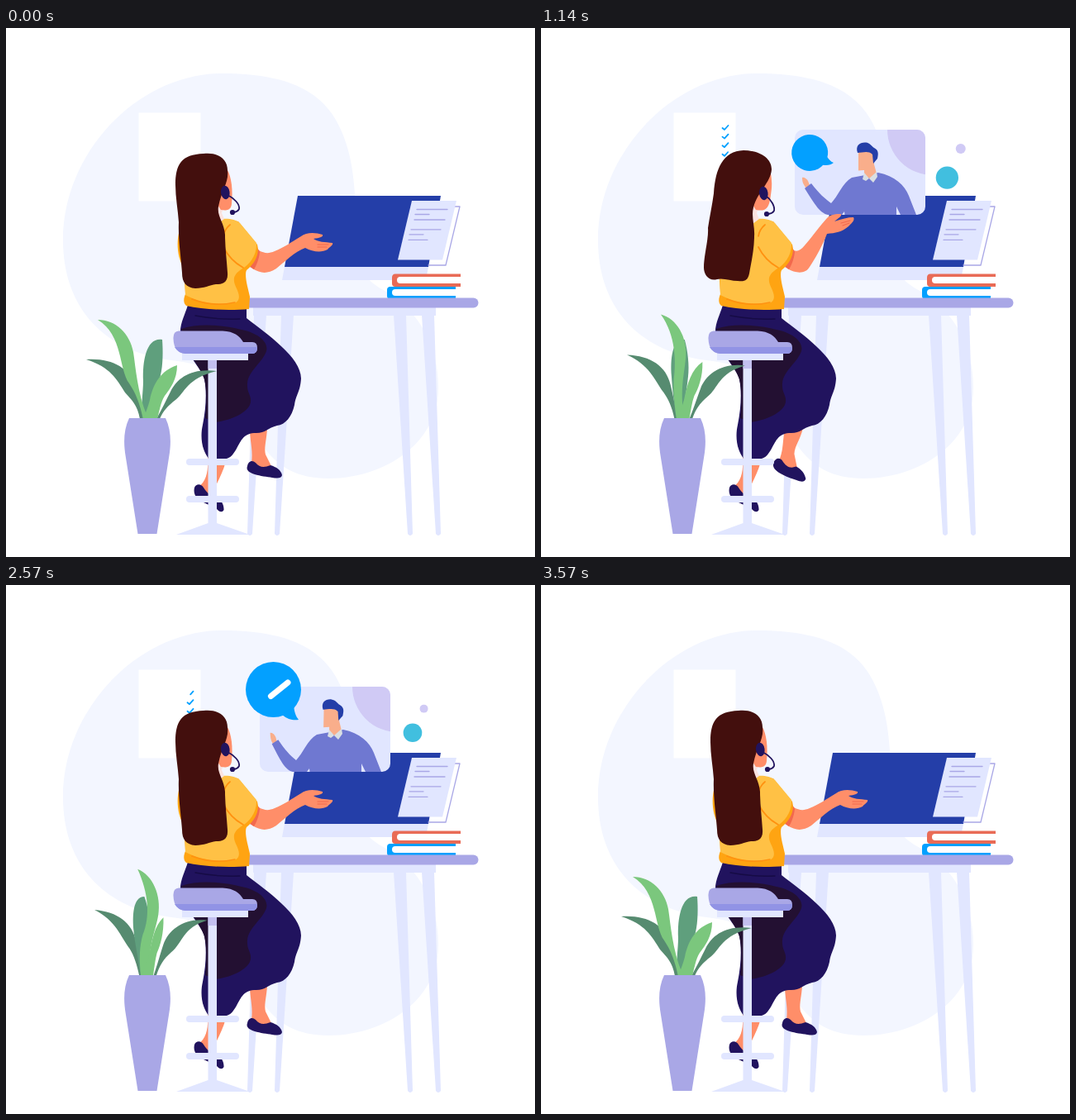
Animation of 640x640 px, one loop 3640 ms. Source, as an HTML page:

```html
<!DOCTYPE html>
<html lang="en">
<head>
<meta charset="utf-8">
<title>Online consultation</title>
<style>
  html, body { margin: 0; width: 100%; height: 100%; overflow: hidden; background: #fff; }
  svg { display: block; width: 100vw; height: 100vh; }
  .lilac { fill: #a9a7e6; }
  .pale { fill: #e1e6ff; }
  .navy { fill: #21135e; }
  .skin { fill: #ff8e69; }
  .blue { fill: #243ea8; }
  .sky { fill: #03a0ff; }
  .knit { fill: #6f78d1; }
  .tan { fill: #f9ae8b; }
  .dark { fill: #568b70; }
  .mid { fill: #5f9f7d; }
  .leaf { fill: #7bc77d; }
  .line { fill: none; stroke-linecap: round; stroke-linejoin: round; }
  .seam { stroke: #ff9110; stroke-width: 1.7; }
  .print { stroke: #a9a7e6; stroke-width: 1.3; }
</style>
</head>
<body>
<svg viewBox="0 0 640 640">
  <defs>
    <clipPath id="cardClip"><rect x="307" y="123" width="158" height="103" rx="10"/></clipPath>
  </defs>

  <!-- backdrop -->
  <path fill="#f3f6ff" d="M69,257C69,150 160,55 262,55C350,55 388,82 406,125C422,162 422,200 424,240C427,298 436,304 453,315C500,340 523,385 523,435C523,505 455,545 390,545C335,545 312,515 290,470C270,415 240,407 200,402C110,390 69,330 69,257Z"/>
  <rect x="160.500" y="102.500" width="75" height="107" fill="#fff"/>
  <g id="ticks" class="line" stroke="#03a0ff" stroke-width="1.800"></g>

  <!-- desk -->
  <g class="pale">
    <path d="M299,338H520V348H299Z"/>
    <path d="M300,347H315L298,612Q295,616 292,612Z"/>
    <path d="M333,347H348L331,612Q328,616 325,612Z"/>
    <path d="M469,347H484L492,612Q489,616 486,612Z"/>
    <path d="M503,347H518L526,612Q523,616 520,612Z"/>
  </g>

  <!-- monitor -->
  <path class="blue" d="M353,203H526L511,289H337Z"/>
  <path class="pale" d="M337,289H511L508,305H334Z"/>
  <path class="line print" d="M543,216H549L532,287H511"/>
  <path class="pale" d="M491,209H545L528,280.500H474Z"/>
  <path class="line print" d="M497,219.500H534M495,225.500H512M494,232H531M490,243.800H526M488,249.800H505M487,256.300H510"/>

  <!-- books -->
  <path fill="#e96b56" d="M550,297.500H471Q467,297.500 467,302V309Q467,313 471,313H550Z"/>
  <path fill="#fff" d="M550,301H477Q473,301 473,305T477,309H550Z"/>
  <path class="sky" d="M544,313H465Q461,313 461,317V324Q461,328 465,328H544Z"/>
  <path fill="#fff" d="M544,316H471Q467,316 467,320T471,324H544Z"/>
  <rect class="lilac" x="270" y="326.500" width="301.500" height="12" rx="6"/>

  <!-- video card -->
  <g id="card">
    <g clip-path="url(#cardClip)">
      <rect class="pale" x="307" y="123" width="158" height="103"/>
      <circle cx="474" cy="123" r="55" fill="#d0caf5"/>
      <path class="tan" data-by="wave" d="M316,181C318,180 321,182 323,185L325,190L321,194C317,189 316,186 316,181Z"
        data-to="M327,175C329,174 333,178 333,182L333,187L328,190C326,185 328,181 327,175Z"/>
      <path class="knit" data-by="wave" d="M376,181L408,175C428,179 440,190 445,203L454,226H435L430,216V226H347C338,224 332,215 319,194L327,188C336,200 344,207 351,212C359,204 365,187 376,181Z"
        data-to="M376,181L408,175C428,179 440,190 445,203L454,226H435L430,216V226H347C340,224 338,220 327,189L334,186C340,198 344,206 351,212C359,204 365,187 376,181Z"/>
      <path class="pale" d="M367,222L364,226H367.500Z"/>
      <g id="head">
        <path class="tan" d="M384,150H403V165L406,176L399,183L391,178V172L384,172.500Z"/>
        <path class="blue" d="M383,151C380,142 386,138 393,138.500C398,139 400,143 403,145C409,148 408,153 407,158L402,164L401,153C396,148 389,151 383,151Z"/>
      </g>
      <path fill="#d9dfe3" d="M391,175L397,182L406,174L407,180L402,187L397,182L393,185L389,183Z"/>
    </g>
  </g>

  <g id="bubble">
    <circle class="sky" cx="323.500" cy="126.500" r="33.500"/>
    <path class="sky" d="M334,157C341,163 348,164 354,163C350,158 349,153 348,146Z"/>
    <path id="check" class="line" stroke="#fff" stroke-width="7" pathLength="1" d="M309.500,127L318,136.500L341,118"/>
  </g>

  <g id="dots">
    <circle cx="491" cy="182.500" r="15" fill="#41bfdf"/>
    <circle cx="509" cy="144" r="6.600" fill="#d0caf5"/>
  </g>

  <!-- legs -->
  <path class="skin" d="M244,518L266,524C262,540 254,552 248,566L233,555C243,548 245,535 244,518Z"/>
  <path class="navy" d="M228,556C230,551 236,551 239,556C244,564 249,567 255,567C260,570 264,577 263.500,583C262,586 259,586 256,583C248,575 224,574 228,556Z"/>
  <path class="skin" data-by="foot" d="M295,485L316,485C315,500 312,508 314,516L322,532L308,535L297,526C299,510 295,500 295,485Z"
    data-to="M295,485L317,485C312,500 305,506 304,515L306,532L295,537L285,523C292,510 291,500 295,485Z"/>
  <path class="navy" data-by="foot" d="M292,530C293,524 298,522 302,526C307,532 312,532 320,529C327,531 333,535 334,541C333,545 329,545 322,544C310,542 288,540 292,530Z"
    data-to="M278,525C280,519 286,518 289,523C293,530 298,534 305,531C311,534 315,541 316,547C314,551 311,551 305,548C295,544 274,535 278,525Z"/>

  <!-- skirt -->
  <path class="navy" d="M220,335L291,338V351C315,370 357,398 357,424C356,440 351,443 349,456C346,470 338,480 328,481C316,484 314,491 300,490C284,491 283,505 275,515C270,523 258,523 246,522C236,510 235,493 238,480C242,460 243,440 240,425C237,412 214,390 211,370C210,358 217,346 220,335Z"/>
  <path fill="#231032" d="M212,364C232,357 262,359 285,365C305,369 318,380 315,391C310,405 293,415 292,430C291,443 299,445 295,456C289,468 268,475 254,477L241,472C243,450 243,438 240,425C236,410 216,392 212,364Z"/>
  <path class="line" stroke="#160b45" stroke-width="1.500" d="M229,348Q255,353 283,352"/>

  <!-- arm and shirt -->
  <path class="skin" data-by="pose" d="M300,262L306,269C313,273 318,273 325,270C338,265 348,257 357,252C363,247 374,247 383,250C384,253 380,254 372,255C377,259 386,259 395,260C396,263 392,264 389,268C382,272 371,271 362,266C350,270 337,283 327,291C316,298 308,297 298,291Z"
    data-to="M300,262L306,269C310,271 314,269 319,263C328,253 336,241 346,230C351,225 357,225 363,225C364,228 361,229 355,234C364,231 371,229 378,229C380,233 376,236 372,240C364,247 356,248 346,249C341,262 333,277 325,289C320,298 308,297 298,291Z"/>
  <path class="line" stroke="#f2694d" stroke-width="1.200" data-by="pose" d="M377,262L390,262M377,265L388,265" data-to="M363,236L374,233M365,239L373,236"/>
  <path fill="#f2694d" d="M303,264L307,271C306,280 303,287 300,292L295,289Z"/>
  <path fill="#ffa412" d="M262,231L281,234L304,262C307,273 302,284 291,293C288,300 293,315 295,325L294,340C270,342 240,341 218,336C214,332 215,327 217,322L215,290C208,280 206,262 209,248Z"/>
  <path fill="#ffc145" d="M260,231C268,230 278,231 283,236L303,260C304,275 294,287 286,291C275,298 274,304 278,313C283,323 284,330 276,333C258,335 235,333 217,323L216,290L212,270L240,240Z"/>
  <path class="line seam" d="M263,265C269,277 278,285 287,290M271,238Q264,244 263,252M225,328Q250,338 277,332"/>

  <!-- head -->
  <path fill="#fbe3e0" d="M250,215H264L261,224L264,231L252,240Z"/>
  <path class="skin" data-by="pose" d="M262,165C272,172 275,192 273,213C272,221 266,221 260,220L250,205Z"
    data-to="M265,163C279,160 281,185 278,202C276,220 271,222 260,220L250,205Z"/>
  <path fill="#430f0d" data-by="pose" d="M239,152C256,150 268,158 268,172C270,186 261,196 257,216C255,228 264,235 265,250C265,265 267,280 268,296C269,308 262,310 254,310C246,311 240,315 229,315C218,314 213,308 213,296C212,280 208,255 209,235C208,220 205,205 205,190C205,165 212,153 239,152Z"
    data-to="M245,148C262,148 279,156 279,171C278,187 262,198 257,217C254,228 259,240 258,252C258,268 254,285 252,297C250,306 246,307 238,306C230,306 220,302 213,304C203,307 197,298 197,290C197,275 203,255 202,242C204,228 207,215 209,200C211,170 220,149 245,148Z"/>
  <path class="line" stroke="#21135e" stroke-width="1.800" data-by="pose" d="M268,202C276,206 283,213 282,219Q280,223 274,223"
    data-to="M272,203C279,208 283,216 282,221Q280,225 273,225"/>
  <g id="headset">
    <ellipse class="navy" cx="265.300" cy="199" rx="5.300" ry="8.300" transform="rotate(-8 265 199)"/>
  </g>
  <circle id="mic" class="navy" cx="274" cy="223" r="3.100"/>

  <!-- stool -->
  <g class="pale">
    <path d="M213,393H293V402H213Z"/>
    <path d="M244.500,402H255V599L295,613H206L244.500,599Z"/>
    <rect x="218" y="521" width="64" height="8" rx="4"/>
    <rect x="218" y="566" width="64" height="8" rx="4"/>
  </g>
  <path fill="#c3c0f0" d="M244.500,402H255V412H244.500Z"/>
  <path class="lilac" d="M209,366.500H262C276,367 283,373 287,380H298Q304,380 304,387T298,394H217Q203,393 202.500,376Q202,367 209,366.500Z"/>
  <path fill="#9193e5" d="M204,386H304Q304,394 298,394H217Q208,393 204,386Z"/>

  <!-- plant -->
  <path class="dark" data-by="sway" d="M97,401C128,399 149,411 155,432C158,444 163,456 167,473L162,473C159,456 152,450 144,441C134,425 126,410 97,401Z"
    data-to="M111,390C138,394 154,408 158,430C161,442 161,456 164,473L161,473C158,460 156,448 152,440C140,425 136,405 111,390Z"/>
  <path class="mid" data-by="sway" d="M189,377C170,374 165,402 166,427C166,440 163,456 165,473L170,466C178,450 184,434 187,420C190,408 190,390 189,377Z"
    data-to="M159,377C147,378 148,400 150,415C152,432 158,445 162,473L167,473C170,458 169,440 169,425C170,408 165,390 159,377Z"/>
  <path class="dark" data-by="sway" d="M255,415C225,411 207,423 199,440C193,452 190,458 182,473L186,473C190,463 196,457 205,450C217,441 218,424 255,415Z"
    data-to="M239,402C212,399 193,414 187,433C183,448 181,458 177,473L180,473C184,460 188,451 198,442C212,431 212,410 239,402Z"/>
  <path class="leaf" data-by="sway" d="M111,353C133,353 150,370 154,392C157,412 159,440 170,468L166,473C161,452 157,442 149,430C136,412 142,372 111,353Z"
    data-to="M178,340C195,350 203,378 196,402C190,424 176,434 176,473L162,473C161,452 163,436 172,420C190,396 184,372 178,340Z"/>
  <path class="leaf" data-by="sway" d="M207,408C188,414 178,430 174,450C172,458 169,465 166,473L183,473C186,462 187,453 192,445C199,436 207,425 207,408Z"
    data-to="M184,400C176,412 176,430 172,450C170,458 166,465 163,473L176,473C177,462 178,453 179,445C182,436 185,420 184,400Z"/>
  <path class="lilac" d="M149,472H193C200,487 200,503 197,520L182.500,612H159.500L145,520C142,503 142,487 149,472Z"/>
</svg>

<script>
const LOOP = 3640, STEPS = 51;
const $ = id => document.getElementById(id);
const lerp = (a, b, k) => a + (b - a) * k;

function ease(n, from, to) {
  const p = Math.min(1, Math.max(0, (n - from) / (to - from)));
  return p * p * (3 - 2 * p);
}
const pulse = (n, a, b, c, d) => ease(n, a, b) - ease(n, c, d);

const NUM = /-?\d+(\.\d+)?/g;
const morphs = [...document.querySelectorAll('[data-to]')].map(el => ({
  el,
  by: el.dataset.by,
  shape: el.getAttribute('d'),
  ends: el.dataset.to.match(NUM).map(Number)
}));

function morph({ el, by, shape, ends }, amounts) {
  let i = 0;
  el.setAttribute('d', shape.replace(NUM, v => lerp(+v, ends[i++], amounts[by]).toFixed(2)));
}

const ticks = [0, 1, 2, 3].map(k => {
  const el = document.createElementNS('http://www.w3.org/2000/svg', 'path');
  el.setAttribute('d', `M219.500,${121 + k * 10.6}l2.500,2l4.500,-5`);
  el.setAttribute('pathLength', 1);
  $('ticks').append(el);
  return el;
});

// Draws a stroke from its start, then wipes it from its start.
function trim(el, drawn, wiped) {
  el.style.visibility = drawn > 0 && wiped < 1 ? 'visible' : 'hidden';
  el.setAttribute('stroke-dasharray', `${Math.max(0.001, drawn - wiped)} 3`);
  el.setAttribute('stroke-dashoffset', -wiped);
}

// Scales and turns a group about a fixed point.
function pose(id, x, y, scale, turn = 0) {
  $(id).style.visibility = scale > 0.002 ? 'visible' : 'hidden';
  $(id).setAttribute('transform',
    `translate(${x} ${y}) rotate(${turn}) scale(${Math.max(scale, 0.001)}) translate(${-x} ${-y})`);
}

function draw(n) {
  const amounts = {
    sway: pulse(n, 4.8, 27, 28.5, 50),
    pose: pulse(n, 8.3, 15.8, 24.3, 33.3),
    foot: pulse(n, 7.5, 20, 24.3, 34.5),
    wave: pulse(n, 16, 24.5, 28, 41)
  };
  morphs.forEach(m => morph(m, amounts));

  const p = amounts.pose;
  $('headset').setAttribute('transform', `translate(${4 * p} ${p})`);
  $('mic').setAttribute('transform', `translate(${-p} ${2 * p})`);
  $('head').setAttribute('transform', `rotate(${3.5 * amounts.wave} 398 178)`);

  const shown = pulse(n, 2.5, 8.3, 46, 50);
  const swell = pulse(n, 2.5, 8.3, 8.8, 14.5) + pulse(n, 42, 46, 46, 50);
  pose('card', 465, 226, shown * (1 + 0.19 * swell), 10.4 * swell - 20 * (1 - shown));

  const pop = pulse(n, 12.3, 18.4, 42.3, 48.5);
  pose('bubble', 354, 163, pop, -80 * (1 - pop));

  pose('dots', 495, 167,
    pulse(n, 7.2, 18, 42.3, 49.5) - 0.29 * pulse(n, 18, 24.5, 34, 42));

  trim($('check'), ease(n, 18.5, 23.5), ease(n, 33.5, 39.5));
  ticks.forEach((el, k) =>
    trim(el, ease(n, 7.7 + 2 * k, 10.4 + 2 * k), ease(n, 32.5 + 2 * k, 35.5 + 2 * k)));
}

function frame() {
  const t = performance.now() % LOOP;
  draw(Math.floor((t + 5) / LOOP * STEPS) % STEPS);
  requestAnimationFrame(frame);
}
frame();
</script>
</body>
</html>
```
